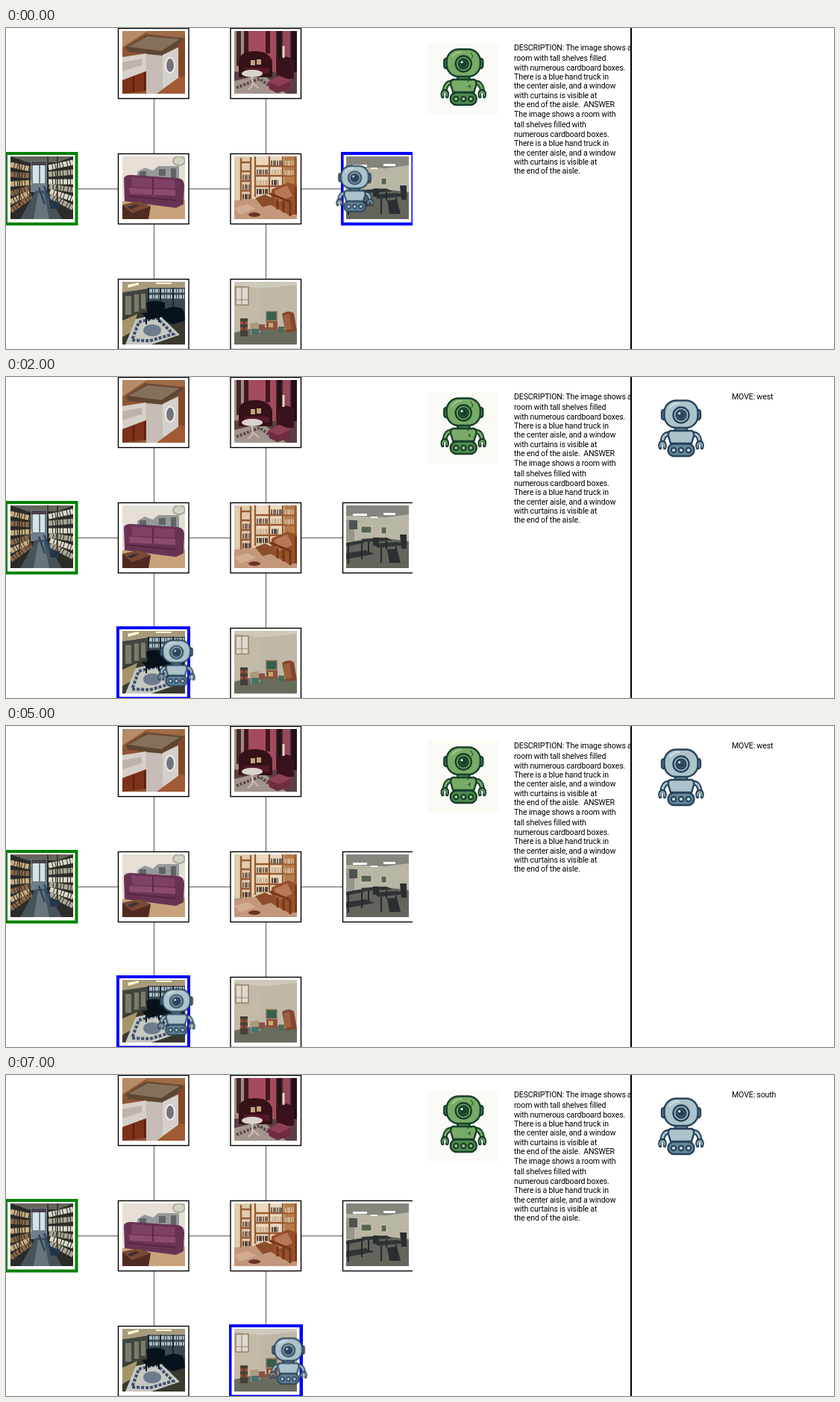
Write an HTML page that moves like this. It is 1110x430 px and loops after 8 s.

```html
<!DOCTYPE html>
<html lang="en">
<head>
<meta charset="utf-8">
<title>Room navigation</title>
<style>
html, body { margin: 0; width: 100%; height: 100%; overflow: hidden; background: #fff; }
body > svg { display: block; width: 1110px; height: 430px; }
text { font: 10.6px Roboto, sans-serif; letter-spacing: -.14px; word-spacing: -.2px; white-space: pre; }
.green { --fill: #78ab66; --lite: #9cc486; --mid: #4f8a4c; --dark: #173f2b; }
.gray { --fill: #adc3cc; --lite: #cbdce2; --mid: #64869a; --dark: #27435a; }
.frame { fill: #fff; stroke: #000; stroke-width: 1.4; }
.outline { fill: none; stroke-width: 4; }
.step { animation: 8s step-end infinite; }
.marker { animation-name: marker; }
.walker { animation-name: walker; }
.panel { animation-name: panel; }
.west { animation-name: west; }
.north { animation-name: north; }
.south { animation-name: south; }
@keyframes marker {
  0% { transform: translate(450.5px, 168px); }
  12.5% { transform: translate(300.5px, 168px); }
  25%, 50%, 62.5% { transform: translate(150px, 336px); }
  37.5%, 75% { transform: translate(150px, 168px); }
  87.5%, 100% { transform: translate(300.5px, 336px); }
}
@keyframes walker {
  0% { transform: translate(467.5px, 183.5px) scale(.82); }
  12.5% { transform: translate(378.5px, 183.5px) scale(.82); }
  25%, 50%, 62.5% { transform: translate(228.5px, 351.5px) scale(.82); }
  37.5%, 75% { transform: translate(228.5px, 183.5px) scale(.82); }
  87.5%, 100% { transform: translate(378.5px, 351.5px) scale(.82); }
}
@keyframes panel { 0% { opacity: 0; } 12.5%, 100% { opacity: 1; } }
@keyframes west { 0%, 37.5%, 75%, 100% { opacity: 0; } 12.5%, 62.5% { opacity: 1; } 50% { opacity: 0; } }
@keyframes north { 0%, 50%, 87.5%, 100% { opacity: 0; } 37.5%, 75% { opacity: 1; } }
@keyframes south { 0%, 62.5% { opacity: 0; } 50%, 87.5%, 100% { opacity: 1; } }
</style>
</head>
<body>
<svg viewBox="0 0 1110 430">
<defs>
  <g id="frame"><rect class="frame" x=".5" y=".5" width="94.5" height="94"/></g>
  <g id="arm" fill="none" stroke-linecap="round">
    <path d="M-17 46Q-24 47-25 56" stroke="var(--dark)" stroke-width="7"/>
    <path d="M-17 46Q-24 47-25 56" stroke="var(--fill)" stroke-width="3"/>
    <path d="M-28 65Q-30 58-25 57Q-20 58-22 65" stroke="var(--dark)" stroke-width="4.5"/>
    <path d="M-28 64Q-29 59-25 58Q-21 59-22 64" stroke="var(--fill)" stroke-width="1.4"/>
  </g>
  <g id="robot" stroke="var(--dark)" stroke-width="2.4">
    <use href="#arm"/><use href="#arm" transform="scale(-1 1)"/>
    <rect x="-8" y="36" width="16" height="8" fill="var(--mid)"/>
    <path d="M-14 42H14Q18 43 17 49L14 59H-14L-17 49Q-18 43-14 42Z" fill="var(--fill)"/>
    <rect x="-26" y="14" width="7" height="13" rx="3" fill="var(--mid)"/>
    <rect x="19" y="14" width="7" height="13" rx="3" fill="var(--mid)"/>
    <rect x="-22.5" y="1.5" width="45" height="36.5" rx="16" fill="var(--fill)"/>
    <path d="M-15 11Q-10 5-3 5" fill="none" stroke="var(--lite)" stroke-linecap="round"/>
    <circle cy="21" r="10.5" fill="var(--fill)"/>
    <circle cy="21" r="6.5" fill="var(--mid)"/>
    <circle cy="21" r="3.6" fill="var(--dark)"/>
    <circle cx="-2.2" cy="18.8" r="1.5" fill="#fff" stroke="none"/>
    <rect x="-17.5" y="59.5" width="35" height="16.5" rx="8" fill="var(--mid)"/>
    <g fill="var(--lite)" stroke-width="2.2"><circle cx="-10" cy="68" r="3.2"/><circle cy="68" r="3.2"/><circle cx="10" cy="68" r="3.2"/></g>
  </g>
</defs>

<svg width="545" height="430">
  <path d="M198.5 94V337M348.5 94V337M95 215.5H452" fill="none" stroke="#808080" stroke-width="1.5"/>
  <use href="#frame" y="168"/>
  <use href="#frame" x="150"/><use href="#frame" x="150" y="168"/><use href="#frame" x="150" y="336"/>
  <use href="#frame" x="300.5"/><use href="#frame" x="300.5" y="168"/><use href="#frame" x="300.5" y="336"/>
  <use href="#frame" x="451" y="168"/>

  <!-- laundry -->
  <svg x="156" y="4" width="84" height="84">
    <path d="M0 0H84V84H0Z" fill="#8f5635"/>
    <path d="M0 0H34L0 22Z" fill="#b58b68"/>
    <path d="M34 0H84V9L32 4Z" fill="#a06c48"/>
    <path d="M70 18L84 8V62L76 60Z" fill="#84492b"/>
    <path d="M4 22L32 5L82 10L72 22L53 33L8 28Z" fill="#5d4733"/>
    <path d="M8 21L34 7L77 11L52 27Z" fill="#85705a"/>
    <path d="M0 35L32 30V54L0 66Z" fill="#d6d0ca"/>
    <path d="M0 42L26 37V46L0 54Z" fill="#bcb4ad"/>
    <path d="M0 66L32 54V80L0 84Z" fill="#7d3119"/>
    <path d="M15 61V82M30 56V80" stroke="#54200f" stroke-width="2"/>
    <path d="M32 31L54 33V84H32Z" fill="#c5bdb6"/>
    <path d="M54 32L75 22V64L54 78Z" fill="#d5d0cd"/>
    <ellipse cx="64" cy="46" rx="6" ry="10" fill="#737579" stroke="#eee" stroke-width="2"/>
    <path d="M46 84L76 62L84 62V84Z" fill="#a05a34"/>
  </svg>

  <!-- parlour -->
  <svg x="306" y="4" width="84" height="84">
    <path d="M0 0H84V84H0Z" fill="#a34b5d"/>
    <path d="M0 0H14V54H0Z" fill="#a38a83"/>
    <path d="M3 0H9V47H3Z" fill="#40292c"/>
    <path d="M13 0H19V50H13ZM42 0H48V30H42Z" fill="#421721"/>
    <path d="M56 0H84V55H56Z" fill="#43202a"/>
    <path d="M65 0H75V36H65Z" fill="#94485a"/>
    <path d="M58 0H63V45H58ZM77 0H84V55H77Z" fill="#211215"/>
    <path d="M0 55H84V84H0Z" fill="#594143"/>
    <path d="M0 67L38 58L70 84H0Z" fill="#a3948d"/>
    <path d="M3 76L34 64L60 83" fill="none" stroke="#5b464a" stroke-width="4" stroke-dasharray="3 2"/>
    <path d="M6 62V38Q10 27 28 27Q47 27 51 41V62Z" fill="#351118"/>
    <path d="M13 49H47V57H13Z" fill="#521a27"/>
    <path d="M22 39H28V46H22ZM30 38H36V45H30Z" fill="#c0a17f"/>
    <path d="M57 54V38Q68 30 80 39V64H57Z" fill="#3a121d"/>
    <path d="M45 68L60 60L76 66L74 78L58 83L47 78Z" fill="#6f2c40"/>
    <path d="M45 68L60 60L76 66L60 74Z" fill="#8f4055"/>
    <path d="M24 59V74L18 79M25 70L33 77" fill="none" stroke="#cbbdb5" stroke-width="2"/>
    <ellipse cx="24" cy="57" rx="14" ry="5" fill="#dad2cd"/>
    <path d="M66 20V36" stroke="#e8d2c2" stroke-width="3"/>
  </svg>

  <!-- archive -->
  <svg x="6" y="172" width="84" height="84">
    <path d="M0 0H84V84H0Z" fill="#2b2b28"/>
    <path d="M0 0H84L64 8H23Z" fill="#66645c"/>
    <path d="M27 6H49V48H27Z" fill="#6d7f8b"/>
    <path d="M30 11H38V36H30ZM40 11H46V36H40Z" fill="#d5e3e8"/>
    <path d="M28 7H48V12H28Z" fill="#4b4049"/>
    <g fill="none" stroke-width="7" stroke-dasharray="5 1 3 1">
      <path d="M0 11L27 17M0 37L28 35M0 61L27 48" stroke="#c8ad80"/>
      <path d="M0 24L27 26M0 50L27 42M0 73L28 53" stroke="#8a6848"/>
      <path d="M51 15L84 8M51 34L84 34M53 47L84 57" stroke="#dcd7c7"/>
      <path d="M51 24L84 21M52 40L84 45M53 53L84 69" stroke="#aba694"/>
    </g>
    <path d="M34 46H48L69 84H13Z" fill="#465359"/>
    <path d="M37 49H45L52 84H31Z" fill="#66767b"/>
    <path d="M50 0V55M63 0V64M26 9V55M12 3V66" stroke="#30281f" stroke-width="1.5"/>
    <path d="M38 42L46 64M45 40L54 62" stroke="#27456d" stroke-width="2.5"/>
    <path d="M52 59L65 61V70H54Z" fill="#23364a"/>
  </svg>

  <!-- sofa -->
  <svg x="156" y="172" width="84" height="84">
    <path d="M0 0H84V84H0Z" fill="#e6dfd6"/>
    <path d="M0 60L84 58V84H0Z" fill="#c9a27b"/>
    <path d="M20 21L30 15L41 19L48 13H76V32H20Z" fill="#96999a"/>
    <path d="M23 20H32V28H23ZM49 17H58V26H49ZM65 16H72V29H65Z" fill="#606467"/>
    <ellipse cx="76" cy="6" rx="8" ry="6" fill="#d3d3c4" stroke="#a7a894" stroke-width="2"/>
    <path d="M2 29Q5 24 14 25L74 29Q83 30 83 39L82 64L72 69L3 60Z" fill="#693253"/>
    <path d="M12 28L70 32V43L13 41Z" fill="#7e4064"/>
    <path d="M9 42L71 45V53L10 50Z" fill="#8a4b6f"/>
    <path d="M41 29V51M6 53L72 59" stroke="#4f223e" stroke-width="1.5"/>
    <path d="M0 65L23 60L38 67L35 84H0Z" fill="#512a21"/>
    <path d="M0 65L23 60L38 67L13 76Z" fill="#7a4836"/>
    <path d="M7 68L18 64L22 66L11 71Z" fill="#383237"/>
  </svg>

  <!-- study -->
  <svg x="306" y="172" width="84" height="84">
    <path d="M0 0H84V84H0Z" fill="#dfcbb0"/>
    <path d="M0 59L84 53V84H0Z" fill="#c3977a"/>
    <path d="M24 0H65V51H24Z" fill="#ead9bf"/>
    <path d="M67 0H84V55H67Z" fill="#b57c4c"/>
    <g stroke="#985a30" stroke-width="2.3" fill="none">
      <path d="M9 2V59M22 1V57M28 0V54M47 0V51M65 0V51M82 0V49M9 8H22M9 20H22M9 33H22M9 46H22M28 13H84M28 26H84M28 40H84"/>
    </g>
    <g stroke-width="7" stroke-dasharray="2 1 4 1" fill="none">
      <path d="M11 28H21M11 41H21M30 21H45M49 9H64" stroke="#786657"/>
      <path d="M30 35H46M50 21H64M68 9H80M68 22H80" stroke="#cfb294"/>
      <path d="M30 47H46M11 54H21M50 35H59" stroke="#57443a"/>
    </g>
    <path d="M50 44L72 35L84 39V77L74 79L49 65Z" fill="#96502b"/>
    <path d="M54 46L71 39L78 53L57 62Z" fill="#b87855"/>
    <path d="M48 50L75 61V80M58 57V71M66 60V75M83 41V78" fill="none" stroke="#743717" stroke-width="3"/>
    <path d="M28 56L41 51L52 56V64L38 68Z" fill="#8d4d2a"/>
    <ellipse cx="27" cy="78" rx="8" ry="3" fill="#6e3028"/>
    <path d="M0 69L18 64L29 70L8 78Z" fill="#d3ad90"/>
  </svg>

  <!-- classroom -->
  <svg x="456" y="172" width="84" height="84">
    <path d="M0 0H84V84H0Z" fill="#bab6a5"/>
    <path d="M0 0H84V12L53 16L0 14Z" fill="#85857e"/>
    <path d="M9 11H28V14H9ZM50 10H66V13H50ZM33 15H42V17H33Z" fill="#fff"/>
    <path d="M0 19H11V48H0Z" fill="#98958a"/>
    <path d="M4 20H15V32H4Z" fill="#4e5252"/>
    <path d="M20 28H34V37H20ZM47 29H54V38H47Z" fill="#56634f" stroke="#d5cfb7"/>
    <path d="M0 50L44 43L84 48V84H0Z" fill="#63645c"/>
    <path d="M0 50L25 46V50L0 55ZM20 45L54 43L62 47L24 49ZM36 51L69 49L80 53L43 57ZM0 64L26 60L38 65L0 72Z" fill="#303335"/>
    <path d="M3 54V78M21 50V72M30 49V63M47 57V77M67 55V77M54 48V59" stroke="#24292a" stroke-width="2"/>
    <path d="M55 59L68 58L73 77H58ZM72 39H81V58H74ZM36 43H44V54H36Z" fill="#292e31"/>
  </svg>

  <!-- lounge -->
  <svg x="156" y="340" width="84" height="84">
    <path d="M0 0H84V84H0Z" fill="#252e32"/>
    <path d="M0 0H84V8L35 9L0 15Z" fill="#a89b7c"/>
    <path d="M7 4L22 1V4L8 8ZM45 1H66V3H45Z" fill="#fff5d6"/>
    <path d="M0 14L34 10V40L0 50Z" fill="#41463f"/>
    <path d="M4 19H12V44H4ZM16 17H22V40H16ZM25 16H31V36H25Z" fill="#7b7b6b"/>
    <path d="M35 8H84V39H35Z" fill="#3b4851"/>
    <g stroke="#a9bac2" stroke-width="5" stroke-dasharray="4 1 2 1"><path d="M36 12H84M36 20H84"/></g>
    <path d="M35 8V31M51 8V38M68 8V38" stroke="#172733" stroke-width="2"/>
    <path d="M0 48L34 38L84 52V84H0Z" fill="#39392f"/>
    <path d="M0 52L20 43L14 66L0 74Z" fill="#a4946a"/>
    <path d="M32 28Q43 23 57 28V45L34 46ZM55 38Q67 30 81 36L84 52L68 57L54 51Z" fill="#07121f"/>
    <path d="M18 50L48 43L77 71L39 84H4Z" fill="#c6c8c1"/>
    <path d="M22 54L46 48L68 70L37 79L13 78Z" fill="none" stroke="#3d506a" stroke-width="4" stroke-dasharray="4 2"/>
    <ellipse cx="40" cy="65" rx="12" ry="8" fill="#6d7c8d"/>
    <path d="M28 43L45 40L53 46L35 50ZM32 47V57M49 45V54" fill="#09121a" stroke="#09121a" stroke-width="2"/>
  </svg>

  <!-- basement -->
  <svg x="306" y="340" width="84" height="84">
    <path d="M0 0H84V84H0Z" fill="#bfb8a8"/>
    <path d="M0 0H84V4L35 9L0 4Z" fill="#cfc9bb"/>
    <path d="M0 4L34 9V61L0 67Z" fill="#c3baa8"/>
    <path d="M2 7H19V31H2Z" fill="#dcdad0" stroke="#9b8368" stroke-width="1.6"/>
    <path d="M10 7V31M3 24H18" stroke="#9b8368" stroke-width="1.2"/>
    <path d="M0 68L35 60L84 66V84H0Z" fill="#686c5d"/>
    <path d="M8 49H18V73H8Z" fill="#473f38"/>
    <path d="M8 55H18M8 63H18" stroke="#984d3b" stroke-width="4" stroke-dasharray="4 2"/>
    <path d="M21 56L32 54L35 68L22 71Z" fill="#a99b80"/>
    <path d="M23 63H33V70H23Z" fill="#44736b"/>
    <path d="M43 40H57V52H43Z" fill="#33604d" stroke="#8f7250" stroke-width="1.5"/>
    <path d="M43 53H58V64H43ZM33 57H41V65H33Z" fill="#8f5040"/>
    <path d="M46 55H52V61H46Z" fill="#c5a96c"/>
    <path d="M64 43Q72 37 80 42L84 66L69 68Z" fill="#84472e"/>
    <path d="M66 45L74 43L77 63L68 65Z" fill="#9f5f3d"/>
    <path d="M59 60H67V68H59Z" fill="#4d6d50"/>
  </svg>

  <rect class="outline" x="0" y="168" width="94.5" height="94.5" stroke="#008000"/>
  <rect class="outline step marker" x="0" y="0" width="95" height="94.5" stroke="#00f"/>
  <use class="gray step walker" href="#robot"/>
</svg>

<rect x="565" y="20" width="96" height="96" fill="#fbfbf6"/>
<use class="green" href="#robot" x="613.3" y="27"/>
<path d="M618 72l3-2M622 76v5M619 79l3-2M625 68l-2 3M623 33l3 5l-2 3" fill="none" stroke="#173f2b"/>
<g transform="translate(681)">
  <text y="30">DESCRIPTION: The image shows a</text>
  <text y="44">room with tall shelves filled</text>
  <text y="57">with numerous cardboard boxes.</text>
  <text y="69">There is a blue hand truck in</text>
  <text y="81">the center aisle, and a window</text>
  <text y="94">with curtains is visible at</text>
  <text y="106">the end of the aisle.  ANSWER</text>
  <text y="119">The image shows a room with</text>
  <text y="133">tall shelves filled with</text>
  <text y="146">numerous cardboard boxes.</text>
  <text y="158">There is a blue hand truck in</text>
  <text y="171">the center aisle, and a window</text>
  <text y="183">with curtains is visible at</text>
  <text y="195">the end of the aisle.</text>
</g>
<path d="M838 0V430" stroke="#000" stroke-width="2"/>

<g class="step panel">
  <use class="gray" href="#robot" x="905" y="30"/>
  <text class="step west" x="973" y="30">MOVE: west</text>
  <text class="step north" x="973" y="30">MOVE: north</text>
  <text class="step south" x="973" y="30">MOVE: south</text>
</g>
</svg>
</body>
</html>
```
